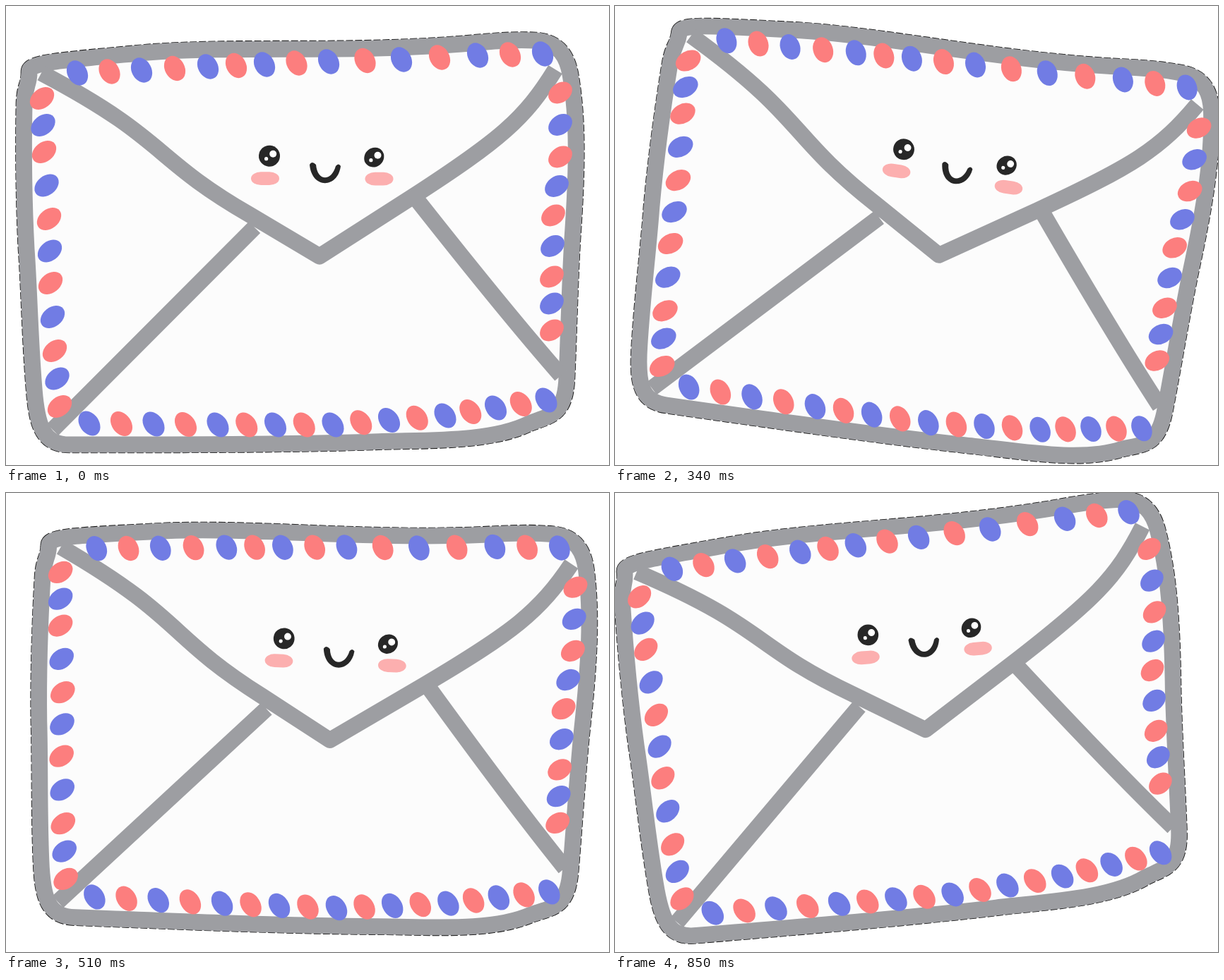
An HTML page with a canvas for the animation above (1020 ms loop, 854 px wide and 651 px high).

```html
<!DOCTYPE html>
<html>
<head>
<meta charset="utf-8">
<title>Happy envelope</title>
<style>
  html, body { margin: 0; height: 100%; overflow: hidden; background: #fff; }
  canvas { display: block; }
</style>
</head>
<body>
<canvas width="854" height="651"></canvas>
<script>
const ctx = document.querySelector('canvas').getContext('2d');
const GRAY = '#9d9ea2', PAPER = '#fcfcfc', INK = '#272727', BLUSH = '#fcafaf';
const RED = '#fc7e7e', BLUE = '#717ce4';
const STEP = 170, LINE = 23;

// The envelope rocks as one rigid piece: centre, rotation in degrees, scale
const POSES = [
  { x: 425.5, y: 322.5, angle: 0, scale: 1 },
  { x: 431.7, y: 317, angle: 3.6, scale: 0.985 },
  { x: 445.2, y: 318.7, angle: 8.15, scale: 0.994 },
  { x: 441.5, y: 317.5, angle: 2.29, scale: 0.994 },
  { x: 432.7, y: 302, angle: -1.67, scale: 0.994 },
  { x: 419, y: 305.2, angle: -4.75, scale: 0.988 },
];

const border = new Path2D(`M33 94C32 80 70 78 200 66C330 56 480 67 645 54
  C680 51 715 47 750 49C785 51 795 75 799 97C810 160 809 230 802 330
  C798 400 797 460 794 527C792 580 772 580 741 592C685 620 590 615 520 618
  C400 622 250 622 92 622C52 623 44 595 40 543C34 470 33 400 29 345
  C25 270 25 190 26 137C27 112 33 112 33 94Z`);
const folds = new Path2D(`M50 95C230 190 205 215 345 296L444 355
  L575 271C700 190 735 160 778 90M352 314L66 601M583 276Q709 436 786 524`);
const mouth = new Path2D(`M430 225Q433 219 439 225C441 249 461 249 467 227
  Q471 222 474 227C470 259 433 260 430 225Z`);

// Airmail dots: each pair of neighbouring keys is split into `per` equal gaps
const SIDES = [
  { first: BLUE, rx: 14, ry: 18.5, tilt: -28, per: 2,
    keys: [[101, 95], [192, 91], [286, 86], [366, 83], [457, 79], [560, 76], [668, 70], [760, 68]] },
  { first: RED, rx: 19, ry: 13.7, tilt: -38, per: 2,
    keys: [[51, 131], [54, 207], [61, 302], [63, 393], [69, 489], [76, 568]] },
  { first: RED, rx: 18.3, ry: 13.7, tilt: -36, per: 2,
    keys: [[785, 123], [785, 214], [775, 297], [773, 384], [773, 460]] },
  { first: BLUE, rx: 13.7, ry: 19, tilt: -34, per: 4,
    keys: [[118, 592], [300, 594], [463, 594], [622, 581], [765, 559]] },
];

const radians = degrees => degrees * Math.PI / 180;

function stroke(path, color, width) {
  ctx.strokeStyle = color;
  ctx.lineWidth = width;
  ctx.stroke(path);
}

function fill(path, color) {
  ctx.fillStyle = color;
  ctx.fill(path);
}

function ellipse(x, y, rx, ry, color, tilt = 0) {
  const path = new Path2D();
  path.ellipse(x, y, rx, ry, radians(tilt), 0, 2 * Math.PI);
  fill(path, color);
}

function drawSide({ first, rx, ry, tilt, per, keys }) {
  const second = first === RED ? BLUE : RED;
  for (let i = 0; i <= per * (keys.length - 1); i++) {
    const k = Math.floor(i / per), part = i % per / per;
    const [x, y] = keys[k], [nextX, nextY] = keys[k + 1] || keys[k];
    ellipse(x + (nextX - x) * part, y + (nextY - y) * part,
      rx, ry, i % 2 ? second : first, tilt);
  }
}

function drawBlush(x, y) {
  const path = new Path2D();
  path.roundRect(x - 20, y - 9.4, 40, 18.8, { x: 14, y: 9.4 });
  fill(path, BLUSH);
}

function drawEye(x, y, rx, ry) {
  ellipse(x, y, rx, ry, INK, -40);
  ellipse(x + 5.2, y - 3, 5, 5, '#fff');
  ellipse(x - 4.4, y + 4, 2.6, 2.6, '#fff');
}

function drawEnvelope() {
  ctx.setLineDash([10, 3]);
  stroke(border, '#111', LINE + 1.6);
  ctx.setLineDash([]);
  fill(border, PAPER);
  stroke(border, GRAY, LINE);
  stroke(folds, GRAY, LINE);
  SIDES.forEach(drawSide);
  drawEye(373, 212.7, 15, 15);
  drawEye(521.3, 214.7, 14.6, 13.3);
  fill(mouth, INK);
  drawBlush(367, 244.7);
  drawBlush(528.5, 245.2);
}

function render() {
  const { x, y, angle, scale } = POSES[Math.floor(performance.now() / STEP) % POSES.length];
  ctx.resetTransform();
  ctx.clearRect(0, 0, 854, 651);
  ctx.lineJoin = 'round';
  ctx.translate(x, y);
  ctx.rotate(radians(angle));
  ctx.scale(scale, scale);
  ctx.translate(-POSES[0].x, -POSES[0].y);
  drawEnvelope();
  requestAnimationFrame(render);
}
render();
</script>
</body>
</html>
```
